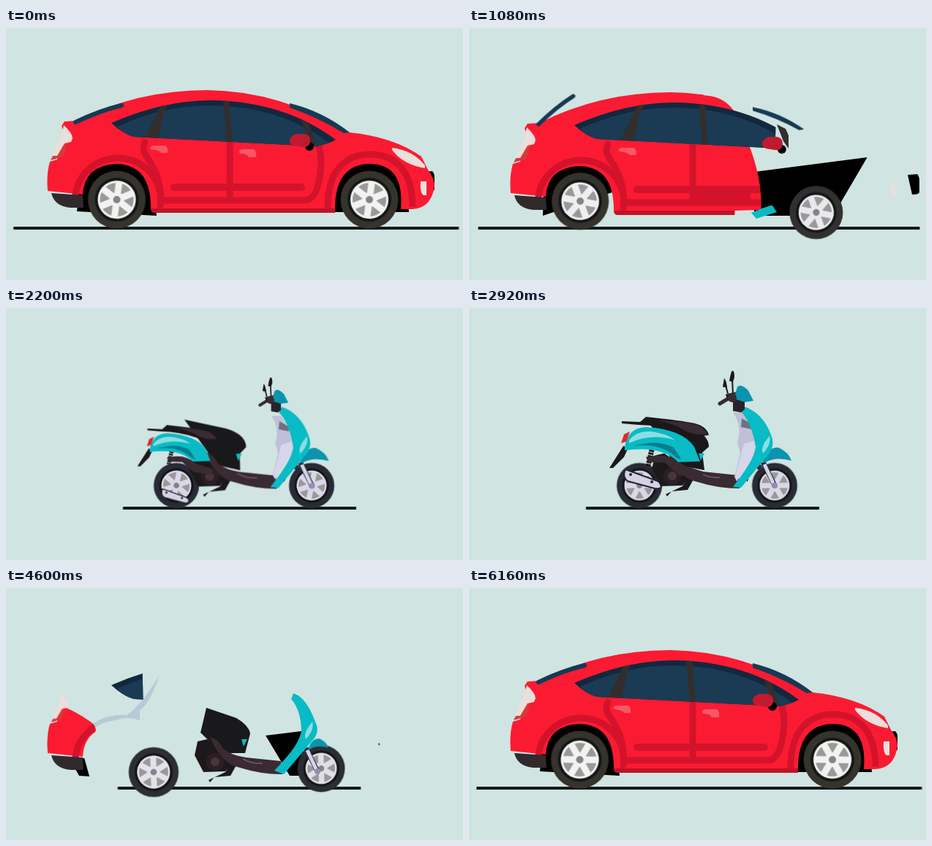
These frames come from a looping animation (625x345 px, 6.2 s). An HTML page without scripts:

```html
<!DOCTYPE html>
<html lang="en">
<head>
<meta charset="utf-8">
<title>Car and scooter</title>
<style>
html,body{margin:0;width:100%;height:100%;overflow:hidden;background:#d0e4e2}
svg{display:block;width:100vw;height:100vh}
.a{animation:none 6.2s linear infinite}
.line{fill:none;stroke:#d3132b;stroke-width:9;stroke-linecap:round;stroke-linejoin:round}

@keyframes ground{
  0%,13%,82%,100%{transform:translateX(314.5px)}
  17.42%{transform:translateX(314.5px) scaleX(.992)}
  20.65%{transform:translateX(315.5px) scaleX(.93)}
  23%{transform:translateX(318px) scaleX(.64)}
  25.8%{transform:translateX(319px) scaleX(.526)}
  27%,71%{transform:translateX(319.5px) scaleX(.524)}
  74.2%{transform:translateX(319px) scaleX(.545)}
  77%{transform:translateX(316px) scaleX(.8)}
  80%{transform:translateX(315px) scaleX(.97)}
}
@keyframes spin{to{transform:rotate(720deg)}}
@keyframes rearWheel{
  0%,16%,80%,100%{transform:translate(151.5px,235px);color:#34332c;stroke:#f2f2f2}
  17.42%{transform:translate(152px,237px) scale(.99)}
  22.6%{transform:translate(185px,252px) scale(.92)}
  25.8%{transform:translate(225px,247px) scale(.81)}
  27.7%,71%{transform:translate(233px,243px) scale(.785);color:#282b35;stroke:#d9d8ea}
  74.2%{transform:translate(202px,252px) scale(.865)}
  76.5%{transform:translate(172px,251px) scale(.95)}
}
@keyframes frontWheel{
  0%,11.6%,82%,100%{transform:translate(497px,235px);color:#34332c;stroke:#f2f2f2}
  15%{transform:translate(485px,250px) scale(.96)}
  17.42%{transform:translate(475px,252.5px) scale(.925)}
  22.6%{transform:translate(428px,250px) scale(.835)}
  25.8%{transform:translate(420px,244px) scale(.8)}
  27.5%,71.6%{transform:translate(418px,243px) scale(.785);color:#282b35;stroke:#d9d8ea}
  74.2%{transform:translate(431px,247px) scale(.82)}
  78%{transform:translate(475px,252px) scale(.924)}
}
@keyframes carBob{
  0%,6%,12%,91%,98.5%,100%{transform:none}
  3%,9%,95%{transform:translateY(-1px)}
  17.42%{transform:translateY(3px)}
  25.8%{transform:translateY(1px)}
  74.2%{transform:translateY(3px)}
  83%{transform:translateY(-4px)}
  87.7%{transform:translateY(-1.3px)}
}
@keyframes bodyCut{
  0%,11.5%,84%,100%{d:path("M0 0L600 0L600 90C600 112 600 120 600 130C600 165 600 200 600 250L600 260L600 345L0 345Z")}
  17.42%,79%{d:path("M0 0L315 0L322 89C350 89 365 109 372 127C385 162 402 197 400 246L364 247L362 345L0 345Z")}
  25.8%{d:path("M0 0L50 0L58 182C64 181 70 181 72 181C88 187 104 209 105 230L105 240L105 345L0 345Z")}
  28.4%,71.5%{d:path("M0 0L-9 0L-9 182C-9 181 -9 181 -9 181C-9 187 -9 209 -9 231L-9 240L-9 345L0 345Z")}
  74.2%{d:path("M0 0L62 0L76 159C95 166 105 174 115 180C128 190 122 198 107 231L107 240L107 345L0 345Z")}
}
@keyframes glassCut{
  0%,12%,84%,100%{d:path("M0 0L462 0L462 200L0 200Z")}
  17.42%{d:path("M0 0L424 0L418 200L0 200Z")}
  25.8%{d:path("M0 0L106 0L192 200L0 200Z")}
  28%,71.5%{d:path("M0 0L100 0L100 200L0 200Z")}
  74.2%{d:path("M0 0L184 0L188 200L0 200Z")}
  79%{d:path("M0 0L414 0L418 200L0 200Z")}
}
@keyframes frontFrame{
  0%,11.6%,84%,100%{d:path("M420 184L545 184L551 252L420 252Z")}
  17.42%{d:path("M390 197L545 177L498 257L390 257Z")}
  25.8%{d:path("M355 199L383 196L399 240L389 255Z")}
  30%,70%{d:path("M378 225L380 225L382 235L380 238Z")}
  74.2%{d:path("M355 202L404 196L405 257L388 257Z")}
  79%{d:path("M390 197L535 177L500 257L390 257Z")}
}
@keyframes rearFrame{
  0%,12%,82%,100%{d:path("M103 184L197 184L206 257L97 251Z")}
  17.42%{d:path("M103 186L195 188L196 225L101 257Z")}
  25.8%{d:path("M85 230L97 230L105 255L98 253Z")}
  28%,71.5%{d:path("M60 240L60 240L60 240L60 240Z")}
  74.2%{d:path("M86 232L107 233L114 258L100 257Z")}
}
@keyframes bumper{
  0%,12%,85%,100%{transform:translate(578px,210px)}
  17.42%{transform:translate(608px,214px)}
  20.6%,73.5%{transform:translate(590px,214px) scale(0)}
  73.6%{transform:translate(510px,214px) scale(.06)}
  74.2%{transform:translate(510px,214px) scale(.1)}
  83%{transform:translate(610px,212px)}
}
@keyframes fog{
  0%,12%,90.3%,100%{transform:none;opacity:1}
  17.42%{transform:translate(9px,0);opacity:.7}
  19%,83%{transform:translate(20px,0);opacity:0}
  87.7%{transform:translate(7px,0);opacity:1}
}
@keyframes headlamp{
  0%,11.6%,87%,100%{transform:none}
  14.5%,82%{transform:scale(0)}
}
@keyframes tailLamp{
  0%,17.42%,80%,100%{transform:none}
  25.8%{transform:scale(.68)}
  28%,71.5%{transform:scale(0)}
  74.2%{transform:scale(.8)}
}
@keyframes spoiler{
  0%,11.6%,86%,100%{transform:none}
  17.42%{transform:rotate(-19deg) scale(.92)}
  21.5%,77%{transform:rotate(-35deg) scale(0)}
  83%{transform:rotate(-8deg)}
}
@keyframes screen{
  0%,11.6%,90.3%,100%{transform:none}
  17.42%{transform:translateY(2px) rotate(-2.6deg) scale(.84)}
  20.6%,79.5%{transform:rotate(-20deg) scale(0)}
  84%{transform:rotate(-16deg)}
  87.7%{transform:rotate(-8.6deg)}
}
@keyframes mirror{
  0%,11.6%,85%,100%{transform:none}
  17.42%{transform:translate(13px,1px)}
  20.6%,80%{transform:translate(-10px,4px) scale(0)}
}
@keyframes pillars{
  0%,11.6%,85%,100%{transform:none}
  17.42%{transform:translateX(17px)}
  22%,79%{transform:translateX(90px)}
}
@keyframes post{
  0%,13%,21%,100%{opacity:0;transform:translateX(-12px)}
  15%,18.5%{opacity:1;transform:none}
}
@keyframes handle{
  0%,11.6%,90.3%,100%{transform:none}
  17.42%,87.7%{transform:translateX(7.5px)}
  22%,82%{transform:translateX(22px)}
}
@keyframes frontHandle{
  0%,14%,87%,100%{opacity:1}
  16%,84%{opacity:0}
}
@keyframes arch{
  0%,11.6%,90.3%,100%{stroke-dashoffset:0}
  16%,81%{stroke-dashoffset:1}
  87.7%{stroke-dashoffset:.29}
}
@keyframes panel{
  0%,14%,23%,100%{opacity:0}
  17%,18%{opacity:1}
}
@keyframes trailOut{
  0%,22%,28%,100%{opacity:0}
  24.5%,26.2%{opacity:1}
}
@keyframes trailIn{
  0%,72.5%,76.5%,100%{opacity:0}
  73.7%,75%{opacity:1}
}

@keyframes scootBob{
  0%,27%,70%,100%{transform:translate(8px,8px)}
  36%,43%,47.1%,51%,55%,59%,62.5%{transform:none}
  39%,45%,49%,53%,57%,61%{transform:translateY(-1px)}
}
@keyframes core{
  0%,18.5%,79%,100%{transform:scale(0)}
  24%,75%{transform:none}
}
@keyframes shield{
  0%,15%,81%,100%{d:path("M400 246C400 246 400 246 400 246C400 246 400 246 400 246L400 246L400 246C400 246 400 246 400 246C400 246 400 246 400 246Z")}
  17.42%,79%{d:path("M406 235C408 236 409 238 410 240C411 241 412 243 413 244L385 253L378 245C382 243 385 242 388 241C395 238 400 237 406 235Z")}
  25.8%,28%,70%,74.2%{d:path("M385 136C400 140 410 160 417 180C420 190 414 198 410 202L372 247L359 242C382 218 392 205 396 188C396 165 388 150 382 144Z")}
  36%,62.5%{d:path("M376 135C396 141 410 160 415 180C417 190 412 198 408 202L372 246L361 245C380 220 390 205 392 190C388 165 380 150 372 142Z")}
}
@keyframes block{
  0%,28%,70%,100%{d:path("M266 156L307 170Q324 180 326 191L319 218L287 218L258 190Z")}
  36%,62.5%{d:path("M242 152L300 164Q328 172 328 190L319 198L322 222L290 216Z")}
}
@keyframes fender{
  0%,22%,77%,100%{transform:scale(0)}
  25.8%,74.2%{transform:translate(2px,2px) scale(.7)}
  35%,63%{transform:none}
}
@keyframes fork{
  0%,22%,77%,100%{transform:scale(0)}
  25%,75%{transform:none}
}
@keyframes rear{
  0%,30%,70.5%,100%{transform:translate(-110px,10px) scale(0)}
  31.6%,69%{transform:translate(-90px,10px) scale(.3)}
  37%,63%{transform:none}
}
@keyframes pipe{
  0%,32%,69%,100%{transform:translate(-25px,50px) scale(0)}
  34%,67%{transform:translate(-10px,34px) scale(.6)}
  38.5%,63%{transform:none}
}
@keyframes inner{
  0%,30%,69%,100%{transform:scale(0)}
  36%,63%{transform:none}
}
@keyframes head{
  0%,31.5%,69%,100%{transform:scale(0)}
  38%,63.5%{transform:none}
  36.5%{transform:scale(1.05)}
}
</style>
</head>
<body>
<svg viewBox="0 0 625 345" preserveAspectRatio="none">
<defs>
  <g id="wheel">
    <circle r="39.5" fill="currentColor" stroke="none"/>
    <circle r="30" fill="#151617" stroke="none"/>
    <g class="a" style="animation-name:spin">
      <circle r="25.5" fill="#9b9895" stroke="none"/>
      <circle r="24.5" fill="none" stroke-width="3"/>
      <path d="M0-25V25M-21.7-12.5L21.7 12.5M-21.7 12.5L21.7-12.5" stroke-width="9"/>
      <circle r="7" fill="none" stroke-width="6"/>
      <circle r="5" fill="#858383" stroke="none"/>
    </g>
  </g>
  <clipPath id="cut"><path class="a" style="animation-name:bodyCut" d="M0 0H600V345H0Z"/></clipPath>
  <clipPath id="pane"><path class="a" style="animation-name:glassCut" d="M0 0H462V200H0Z"/></clipPath>
  <clipPath id="glass"><path id="win" d="M144 130Q215 99 280 99Q380 100 451 153Q440 159 425 162L175 149Q160 145 144 130Z"/></clipPath>
</defs>

<rect class="a" style="animation-name:ground" x="-304.5" y="272" width="609" height="4" fill="#17181a"/>
<path class="a" style="animation-name:rearFrame" d="M103 184L197 184L206 257L97 251Z"/>
<path class="a" style="animation-name:frontFrame" d="M420 184L545 184L551 252L420 252Z"/>
<path class="a" style="animation-name:bumper" d="M-8-13L5-14Q8-11 8-6V11Q7 14-2 14Z"/>
<g fill="#b7cad6">
  <path class="a" style="animation-name:trailOut" d="M96 222Q108 172 157 170Q172 171 182 177Q150 174 130 186Q112 194 104 214Z"/>
  <path class="a" style="animation-name:trailIn" d="M118 186Q140 172 165 174Q183 163 210 119Q196 160 183 167V181Q165 175 150 181Q130 183 118 194Z"/>
</g>

<g class="a" style="animation-name:carBob">
  <g clip-path="url(#cut)">
    <path fill="#fa1b32" d="M80 128L96 127Q180 85 275 85Q375 86 470 143Q530 149 568 176L577 194Q586 206 586 216Q582 247 555 248H540Q545 186 497 186Q448 187 450 253H203Q198 253 198 246Q198 187 151 186Q107 188 105 228L57 223Q55 200 60 183L70 180L80 145L76 134Z"/>
    <g class="line">
      <path d="M95 228A57 56 0 0 1 211 243"/>
      <path class="a" style="animation-name:arch" pathLength="1" stroke-dasharray="1 2" stroke-linecap="butt" d="M440 248C439 198 462 173 498 173C536 173 556 200 556 245"/>
      <path d="M190 156C180 178 212 180 212 240M215 236H408Q428 236 431 185Q431 160 418 140M306 150V236"/>
      <path stroke-width="10" d="M230 218H404"/>
    </g>
    <path class="a" style="animation-name:panel" fill="#d3132b" d="M302 213H382L388 240H302Z"/>
    <path fill="#c01328" d="M198 247H450V253H203Q199 253 198 247Z"/>
    <path fill="#302a2d" d="M62 226L105 229L106 246L88 246Q66 244 62 226Z"/>
    <g fill="#f75766">
      <path class="a" style="animation-name:handle" d="M200 161H218Q222 164 221 171H212Q210 167 198 166Q196 163 200 161Z"/>
      <g class="a" style="animation-name:frontHandle"><path class="a" style="animation-name:handle" d="M322 166H339Q343 169 342 177H332Q330 172 320 172Q317 168 322 166Z"/></g>
    </g>
  </g>
  <g clip-path="url(#pane)">
    <use href="#win" fill="#12283f"/>
    <path fill="#1a3b53" d="M152 135Q215 106 280 106Q375 107 442 157L425 162L175 149Q162 146 152 135Z"/>
    <g clip-path="url(#glass)">
      <g class="a" style="animation-name:pillars" fill="none" stroke="#332e2e" stroke-width="8">
        <path d="M219 101L190 158M301 97L306 160M404 115L422 165"/>
        <path d="M211 120L204 151" stroke-width="9"/>
      </g>
    </g>
  </g>
  <g class="a" style="animation-name:tailLamp;transform-origin:64px 180px">
    <path fill="#d9383a" d="M84 154L79 176L61 181L70 164Z"/>
    <path fill="#ecdedb" d="M79 133Q91 144 91 151L89 156L80 158L70 175L63 175Q69 160 76 147Z"/>
  </g>
  <path class="a" style="animation-name:spoiler;transform-origin:95px 129px" d="M95 129Q128 113 158 106" fill="none" stroke="#173a53" stroke-width="6" stroke-linecap="round"/>
  <path class="a" style="animation-name:screen;transform-origin:388px 105px" d="M388 103Q433 114 470 143L462 144Q426 122 388 109Z" fill="#173a53"/>
  <path class="a" style="animation-name:post" d="M421 129L433 135L437 144V162L430 152Z" fill="#332e2e"/>
  <g class="a" style="animation-name:mirror;transform-origin:404px 155px">
    <circle cx="415" cy="162" r="6"/>
    <path fill="#c11a2f" d="M397 145H409Q417 147 416 156Q414 164 406 163L393 161Q387 158 388 153Q390 147 397 145Z"/>
  </g>
  <path class="a" style="animation-name:headlamp;transform-origin:572px 190px" fill="#ecdedb" d="M528 164Q556 167 573 188V192Q543 187 528 167Z"/>
  <path class="a" style="animation-name:fog" fill="#ecdedb" d="M567 210H575V229H571Q566 226 567 210Z"/>
</g>

<g class="a" style="animation-name:rearWheel"><use href="#wheel"/></g>
<g class="a" style="animation-name:frontWheel"><use href="#wheel"/></g>

<g class="a" style="animation-name:scootBob">
  <g class="a" style="animation-name:fork;transform-origin:412px 235px">
    <path d="M402 211L418 243M398 214L394 220" fill="none" stroke="#2c2a34" stroke-width="7"/>
    <path d="M404 214L417 242" fill="none" stroke="#d5d3e8" stroke-width="5"/>
    <circle cx="418" cy="243" r="4" fill="#8f91a8"/>
  </g>
  <g class="a" style="animation-name:pipe;transform-origin:238px 234px">
    <path fill="#d3d2e6" stroke="#27242a" stroke-width="2" d="M214 221L258 237Q265 241 262 246Q260 248 254 247L217 237Q209 231 214 221Z"/>
    <circle cx="221" cy="228" r="2" fill="#27242a"/><circle cx="250" cy="238" r="2" fill="#27242a"/>
  </g>
  <g class="a" style="animation-name:core;transform-origin:330px 240px">
    <path fill="#1d191b" d="M254 202L267 199L289 214L301 232L292 243L262 244L250 221Z"/>
    <path class="a" style="animation-name:block" fill="#19181a" d="M266 156L307 170Q324 180 326 191L319 218L287 218L258 190Z"/>
    <path fill="#1b191b" d="M269 255L292 244L301 229L309 231L299 249L277 251L271 258Z"/>
    <path fill="#3a2a31" d="M271 196Q284 200 289 212Q300 221 320 224L368 229L370 247Q340 247 312 238Q287 234 271 196Z"/>
    <path fill="none" stroke="#6b5963" stroke-width="1.5" d="M316 226Q328 233 343 232"/>
    <circle cx="278" cy="230" r="12" fill="#2a2024"/><circle cx="278" cy="230" r="6" fill="#49333c"/>
    <path fill="#08bbc4" d="M314 199H322L317 209Z"/>
  </g>
  <g class="a" style="animation-name:rear;transform-origin:255px 190px">
    <path fill="#1b181a" d="M192 219L211 189L218 191L212 204L197 219Z"/>
    <path d="M250 194L245 216" stroke="#1b181a" stroke-width="7" stroke-dasharray="3 1"/>
    <path fill="#3a2a31" d="M242 204Q274 197 290 214L320 224V234L288 229L268 212L245 211Z"/>
    <path fill="#1b181a" d="M209 155L234 156L242 149Q290 154 309 158Q325 162 328 174Q306 178 294 171Q260 160 232 160L209 158Z"/>
    <path fill="#3a2a31" d="M258 154Q295 155 312 160Q323 165 326 173Q306 174 296 168Q280 158 258 154Z"/>
    <path fill="#08bbc4" d="M213 190Q217 164 242 163Q292 166 308 190L316 210L286 211Q264 188 213 195Z"/>
    <path fill="#8cdde2" d="M219 181Q229 168 249 169Q271 172 282 181Q249 171 219 185Z"/>
    <path fill="#087e91" d="M225 189Q258 179 280 191L291 208L284 205Q262 184 225 189Z"/>
    <path fill="#e4262f" d="M208 185L212 173L220 169L215 183Z"/>
  </g>
  <g class="a" style="animation-name:inner;transform-origin:378px 195px">
    <path fill="#bfc0d7" d="M361 143H375Q391 164 393 194L366 237L363 231L371 199L367 184Q374 161 361 143Z"/>
    <path fill="#d6d5ea" d="M376 186L392 181L393 194L366 237L364 230Z"/>
    <path fill="#70717f" d="M373 151L389 160L387 166L372 163Z"/>
  </g>
  <g class="a" style="animation-name:fender;transform-origin:408px 208px">
    <path fill="#0b94ad" d="M401 212Q408 190 423 191Q437 197 441 209Q420 203 406 211Z"/>
  </g>
  <path class="a" style="animation-name:shield" fill="#08bbc4" d="M400 246Z"/>
  <g class="a" style="animation-name:fork;transform-origin:405px 190px">
    <path fill="#8cdde2" d="M411 175Q414 187 402 199Q399 193 405 183Z"/>
  </g>
  <g class="a" style="animation-name:head;transform-origin:368px 140px">
    <path d="M343 131L356 123" stroke="#3a2a31" stroke-width="5" stroke-linecap="round"/>
    <path d="M361 118L360 98M354 117L351 106" stroke="#1b181a" stroke-width="2"/>
    <path fill="#1b181a" d="M359 87Q363 83 363 95L361 101L356 100Q357 93 359 87ZM349 96Q352 99 353 109L347 108Z"/>
    <path fill="#29222a" d="M351 118L365 115L377 128V139L372 143L361 141V129L353 126Z"/>
    <path fill="#0b94ad" d="M362 124L367 108Q372 103 382 113L389 127L377 129Z"/>
    <circle cx="360" cy="123" r="6" fill="#3a2a31"/>
  </g>
</g>
</svg>
</body>
</html>
```
